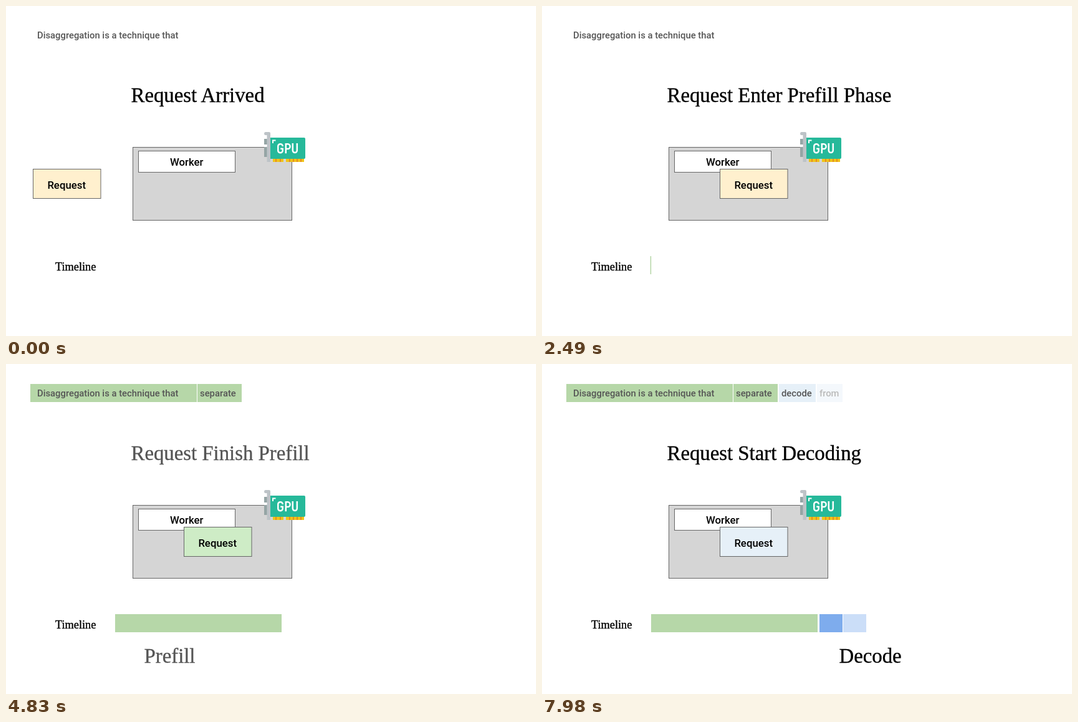
An HTML page for the animation above (8 s loop, 850x529 px).

```html
<!DOCTYPE html>
<html lang="en">
<head>
<meta charset="utf-8">
<title>Prefill and decode timeline</title>
<style>
  html, body { margin: 0; width: 100%; height: 100%; overflow: hidden; background: #fff; }
  svg { display: block; }
  text { font: 500 16.8px Roboto, sans-serif; }
  .header text { font-size: 14.8px; fill: #555; }
  .serif text { font: 32.8px "Liberation Serif", serif; stroke: #000; stroke-width: .35px; }
  .serif .small { font-size: 18.3px; }
  .box { stroke: #666; }
  .mid { text-anchor: middle; }
</style>
</head>
<body>
<svg width="850" height="529" viewBox="0 0 850 529">
  <g class="header">
    <rect id="promptFill" x="39" y="32" width="267" height="29" fill="#b6d7a8"/>
    <text x="50" y="52">Disaggregation is a technique that</text>
    <g id="separate">
      <rect x="307" y="32" width="71" height="29" fill="#b6d7a8"/>
      <text x="311" y="52">separate</text>
    </g>
    <g id="decode">
      <rect x="380" y="32" width="59" height="29" fill="#e6f0f8"/>
      <text x="384" y="52">decode</text>
    </g>
    <g id="from">
      <rect x="441" y="32" width="41" height="29" fill="#e6f0f8"/>
      <text x="445" y="52">from</text>
    </g>
  </g>

  <g class="serif">
    <text id="arrived" x="200.5" y="154">Request Arrived</text>
    <text id="enterPrefill" x="200.5" y="154">Request Enter Prefill Phase</text>
    <text id="finishPrefill" x="200.5" y="154">Request Finish Prefill</text>
    <text id="enterDecode" x="200.5" y="154">Request Enter Decode Phase</text>
    <text id="startDecode" x="200.5" y="154">Request Start Decoding</text>
    <text class="small" x="79" y="423.5">Timeline</text>
    <text id="prefillLabel" x="221.5" y="479">Prefill</text>
    <text id="decodeLabel" x="476.5" y="479">Decode</text>
  </g>

  <rect class="box" x="203.5" y="226.5" width="255" height="117" fill="#d5d5d5"/>
  <rect class="box" x="212.5" y="232.5" width="155" height="34" fill="#fff"/>
  <text class="mid" x="289.7" y="255.5">Worker</text>

  <!-- graphics card -->
  <path d="M414 213h5v9h-5zM414 226h5v16h-5z" fill="#95a5a5"/>
  <path d="M416 202h6q2 0 2 2v46h-5.5v-43h-2.5q-2 0-2-2.5t2-2.5z" fill="#bdc3c7"/>
  <path d="M428 245h17v5h-17zM449 245h29v5h-29z" fill="#f0c419"/>
  <path d="M433 245v5M440 245v5M455 245v5M461 245v5M467 245v5M473 245v5" stroke="#e57e25" stroke-width="1.6"/>
  <path d="M424 211h54q2 0 2 2v30q0 2-2 2h-54z" fill="#26b99a"/>
  <g fill="none" stroke="#fff">
    <path d="M428 220v-4.5h4.5" stroke-width="2"/>
    <path d="M443.7 225v-.4a3.7 3.3 0 0 0-7.4 0v7.3a3.7 3.3 0 0 0 7.4 0v-3.2h-3.5M448.8 236.3v-15h3.2a3.6 3.9 0 0 1 0 7.8h-3.2M459.8 220v11.6a3.5 3.5 0 0 0 7 0v-11.6" stroke-width="2.5"/>
  </g>

  <g id="request">
    <rect id="requestFill" class="box" x=".5" y="261.5" width="108.5" height="47"/>
    <text class="mid" x="54.2" y="293">Request</text>
  </g>

  <rect id="prefillBar" y="401" height="29" fill="#b6d7a8"/>
  <rect id="decodeBar" x="445" y="401" width="37" height="29" fill="#7eaced"/>
  <rect id="nextBar" x="483" y="401" width="37" height="29" fill="#7eaced"/>
</svg>
<script>
const LOOP = 8000, STEP = 30;
const YELLOW = [255, 240, 206], GREEN = [200, 235, 186], BLUE = [230, 240, 248];

const el = id => document.getElementById(id);
const clamp = v => Math.min(1, Math.max(0, v));
const lerp = (a, b, p) => a + (b - a) * p;
const span = (t, start, length) => clamp((t - start) / length);
const mix = (a, b, p) => `rgb(${a.map((v, i) => Math.round(lerp(v, b[i], p)))})`;

// cubic-bezier(.42, 0, .58, 1)
function ease(x) {
  let lo = 0, hi = 1;
  for (let i = 0; i < 24; i++) {
    const s = (lo + hi) / 2, r = 1 - s;
    if (1.26 * r * r * s + 1.74 * r * s * s + s ** 3 < x) lo = s; else hi = s;
  }
  return lo * lo * (3 - 2 * lo);
}

// Within a transition, old items vanish before new ones appear.
const leave = p => clamp(1 - p / .6);
const enter = p => clamp((p - .64) / .35);

function show(opacity, ...ids) {
  for (const id of ids) el(id).setAttribute("opacity", opacity);
}

function draw(t) {
  const move = ease(span(t, 450, 1580));
  const prefill = ease(span(t, 2460, 900));
  const decode = ease(span(t, 4560, 870));
  const firstToken = span(t, 6540, 240);

  show(leave(move), "arrived");
  show(enter(move) * leave(prefill), "enterPrefill");
  show(enter(prefill) * leave(decode), "finishPrefill", "prefillLabel");
  show(enter(decode), "decodeLabel");
  show(enter(decode) * (1 - span(t, 5910, 240)), "enterDecode");
  show(firstToken, "startDecode", "decode", "decodeBar");
  show(span(t, 7890, 225), "from", "nextBar");
  show(prefill, "promptFill");
  show(span(t, 3780, 270), "separate");

  el("request").setAttribute("transform", `translate(${lerp(43, 285, move)})`);
  el("requestFill").setAttribute("fill",
    decode ? mix(GREEN, BLUE, decode) : mix(YELLOW, GREEN, prefill));

  const bar = el("prefillBar");
  bar.setAttribute("x", lerp(173.6, 175, prefill));
  bar.setAttribute("width", lerp(1, 267, prefill));
  show(enter(move), "prefillBar");
}

function tick() {
  const t = performance.now() % LOOP;
  draw(Math.floor(t / STEP) * STEP);
  requestAnimationFrame(tick);
}
tick();
</script>
</body>
</html>
```
